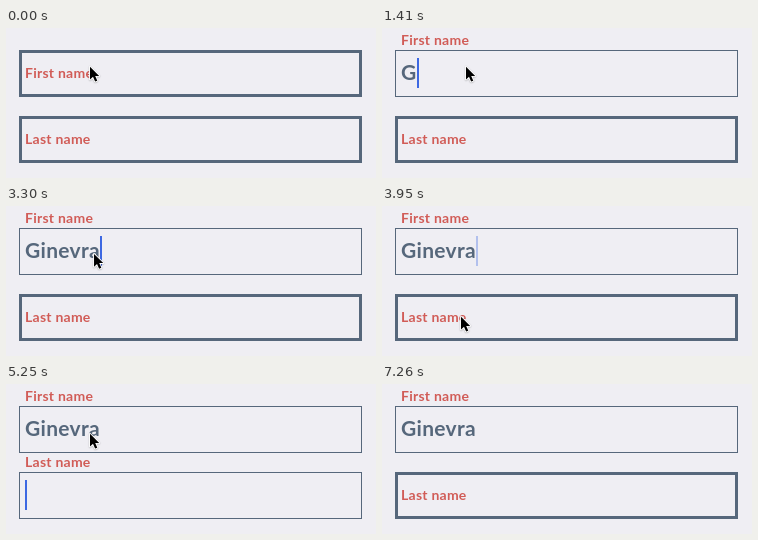
These frames come from a looping animation (370 px wide and 150 px high, 7.36 s). An HTML page with a canvas:

```html
<!DOCTYPE html>
<html lang="en">
<head>
<meta charset="utf-8">
<title>Floating labels</title>
<style>
  html, body { margin: 0; width: 100%; height: 100%; overflow: hidden; background: #efeef3; }
  canvas { display: block; width: 370px; height: 150px; }
</style>
</head>
<body>
<canvas id="stage"></canvas>
<script>
const LOOP = 7360;
const INK = '#56677b', LABEL = '#d15c57', CARET = '#3d68e2', BG = '#efeef3';
const FONT = 'Lato, "Open Sans", sans-serif';
const NAME = 'Ginevra';
const KEYS = [1410, 1770, 2010, 2240, 2540, 2780, 2900];
const FOCUS_FIRST = 720, FOCUS_LAST = 4140, BACK = 5600;

// Pointer stops: time, x, y of the tip. Each list is one smooth move.
const MOVES = [
  [[3170, 83, 37], [3300, 87, 46], [3450, 91, 76], [3590, 84, 102], [3710, 78, 109]],
  [[4740, 78, 109], [4900, 80, 95], [5080, 82, 62], [5250, 83, 48]],
  [[6180, 83, 48], [6310, 105, 58], [6430, 175, 87], [6540, 265, 124], [6640, 332, 158]]
];

const canvas = document.getElementById('stage');
const ctx = canvas.getContext('2d');
const dpr = window.devicePixelRatio || 1;
canvas.width = 370 * dpr;
canvas.height = 150 * dpr;

const clamp = v => Math.max(0, Math.min(1, v));

function ease(v) {
  v = clamp(v);
  return v * v * (3 - 2 * v);
}

const progress = (t, start) => ease((t - start + 25) / 225);

function spline(a, b, c, d, u) {
  return b + u / 2 * (c - a + u * (2 * a - 5 * b + 4 * c - d + u * (3 * (b - c) + d - a)));
}

function pointerAt(t) {
  let pos = [83, 37];
  for (const path of MOVES) {
    const end = path.length - 1;
    if (t < path[0][0]) break;
    if (t >= path[end][0]) {
      pos = path[end].slice(1);
      continue;
    }
    const i = path.findIndex(p => p[0] > t) - 1;
    const q = [i - 1, i, i + 1, i + 2].map(k => path[Math.max(0, Math.min(end, k))]);
    const u = (t - q[1][0]) / (q[2][0] - q[1][0]);
    pos = [1, 2].map(k => spline(q[0][k], q[1][k], q[2][k], q[3][k], u));
  }
  return pos;
}

// Caret opacity for the time since focus or the last key.
function blink(age) {
  if (age < 515) return 1;
  const p = (age - 515) % 1000;
  if (p < 515) return Math.max(0, 1 - Math.ceil((p + 1) / 60) / 3);
  return clamp((p - 510) / 75);
}

function text(str, x, y, size, color, spacing) {
  ctx.font = `700 ${size}px ${FONT}`;
  ctx.letterSpacing = spacing + 'px';
  ctx.fillStyle = color;
  ctx.fillText(str, x, y);
  return ctx.measureText(str).width;
}

function field(y, label, lift) {
  const w = 3 - 2 * lift;
  ctx.strokeStyle = INK;
  ctx.lineWidth = w;
  ctx.strokeRect(13 + w / 2, y + w / 2, 343 - w, 47 - w);
  text(label, 19, y + 28 - 33 * lift, 14, LABEL, 0.25);
}

function caret(x, y, alpha) {
  ctx.globalAlpha = alpha;
  ctx.fillStyle = CARET;
  ctx.fillRect(Math.round(x), y, 2, 30);
  ctx.globalAlpha = 1;
}

const arrow = new Path2D('M1 1.8V14.6L4 11.8L6.1 16.6L8.3 15.7L6.2 10.9H10.2Z');

function pointer([x, y]) {
  ctx.save();
  ctx.translate(x, y);
  ctx.lineJoin = 'round';
  ctx.lineWidth = 1.8;
  ctx.strokeStyle = '#fff';
  ctx.shadowColor = 'rgba(0,0,0,.3)';
  ctx.shadowBlur = 1.5 * dpr;
  ctx.shadowOffsetY = 0.5 * dpr;
  ctx.stroke(arrow);
  ctx.shadowColor = 'transparent';
  ctx.fillStyle = '#000';
  ctx.fill(arrow);
  ctx.restore();
}

function draw(t) {
  ctx.setTransform(dpr, 0, 0, dpr, 0, 0);
  ctx.fillStyle = BG;
  ctx.fillRect(0, 0, 370, 150);

  field(22, 'First name', progress(t, FOCUS_FIRST));
  field(88, 'Last name', progress(t, FOCUS_LAST) - progress(t, BACK));

  const typed = KEYS.filter(k => k <= t);
  const width = text(NAME.slice(0, typed.length), 19, 52, 21, INK, 0.3);

  if (t >= FOCUS_LAST && t < BACK) {
    caret(19, 96, blink(t - FOCUS_LAST));
  } else if (t >= FOCUS_FIRST) {
    const since = t >= BACK ? BACK + 10 : typed.length ? typed[typed.length - 1] : FOCUS_FIRST;
    caret(19 + width, 30, blink(t - since));
  }
  pointer(pointerAt(t));
}

function tick() {
  draw(performance.now() % LOOP);
  requestAnimationFrame(tick);
}
tick();
</script>
</body>
</html>
```
